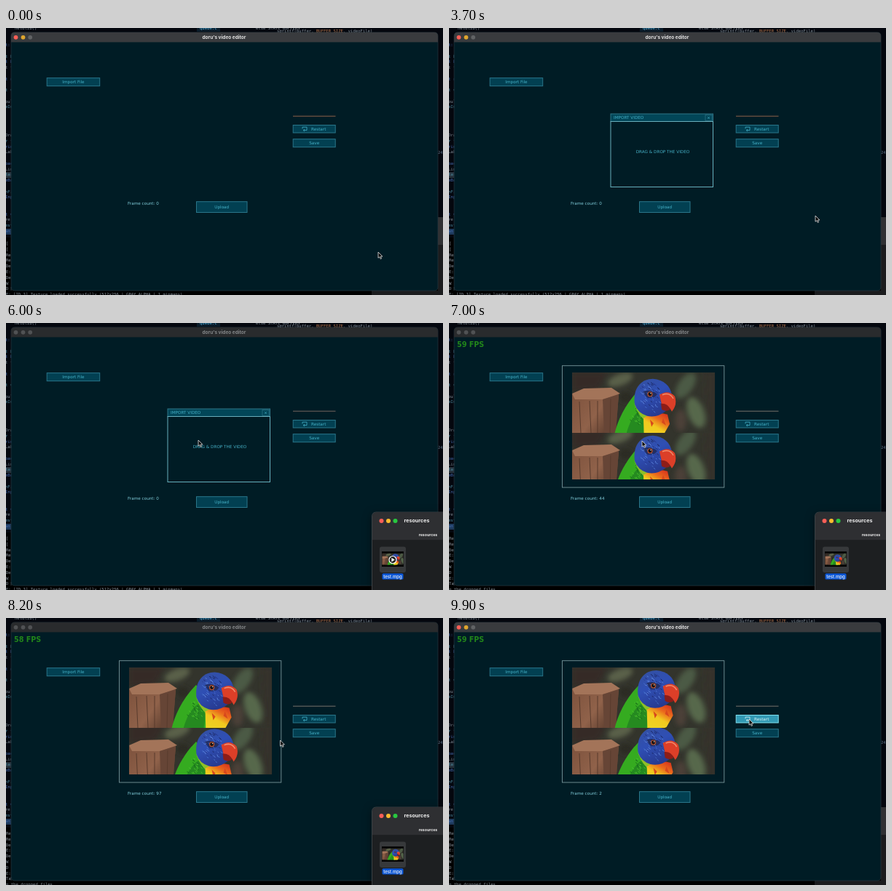
Write an HTML page that moves like this. It is 600 px wide and 367 px high and loops after 10000 ms.

```html
<!DOCTYPE html>
<html lang="en">
<head>
<meta charset="utf-8">
<title>Video editor</title>
<style>
html, body { margin: 0; width: 100%; height: 100%; overflow: hidden; background: #03060b; }
svg { display: block; }
#stage { width: 100vw; height: 100vh; }
.ui { font: 5.7px "DejaVu Sans", sans-serif; fill: #45b0c6; }
.code { font: 5.6px "DejaVu Sans Mono", monospace; fill: #87929c; white-space: pre; }
.mac { font: 700 6.5px Inter, sans-serif; text-anchor: middle; }
.mid { text-anchor: middle; }
.btn rect { fill: #024052; stroke: #2a768a; }
.btn path { fill: none; stroke: #45b0c6; stroke-width: .8; }
.hover rect { fill: #3299b4; stroke: #82e0ee; }
.hover text { fill: #d5f2f6; }
.hover path { stroke: #d5f2f6; }
.press rect { fill: #ffbc51; stroke: #eb7630; }
.press text { fill: #d86f36; }
.shadow { filter: drop-shadow(0 3px 6px rgba(0, 0, 0, .5)); }
</style>
</head>
<body>
<svg id="stage" viewBox="0 0 600 367" preserveAspectRatio="none">
  <defs>
    <filter id="soft" x="-20%" y="-20%" width="140%" height="140%"><feGaussianBlur stdDeviation="3"/></filter>
    <filter id="blend"><feGaussianBlur stdDeviation=".6"/></filter>
    <linearGradient id="wood" x2="1" y2=".6">
      <stop stop-color="#7d523d"/><stop offset=".6" stop-color="#90624a"/><stop offset="1" stop-color="#5e3f30"/>
    </linearGradient>
    <linearGradient id="chest" x1=".8" x2=".3" y2="1">
      <stop stop-color="#d9361d"/><stop offset=".25" stop-color="#ea6a1c"/><stop offset=".5" stop-color="#f2c91f"/><stop offset="1" stop-color="#e9d824"/>
    </linearGradient>
    <linearGradient id="crown" x2=".5" y2="1">
      <stop stop-color="#34509f"/><stop offset=".5" stop-color="#2f4fb4"/><stop offset="1" stop-color="#273a90"/>
    </linearGradient>
    <g id="bird">
      <rect width="196" height="83" fill="#33342c"/>
      <g filter="url(#soft)">
        <path d="M0 0H48L36 22 0 26Z" fill="#352a25"/>
        <ellipse cx="66" cy="10" rx="18" ry="8" fill="#5a6148" transform="rotate(-20 66 10)"/>
        <ellipse cx="74" cy="34" rx="9" ry="7" fill="#2a2c23"/>
        <ellipse cx="156" cy="18" rx="10" ry="20" fill="#4c5a44" transform="rotate(35 156 18)"/>
        <ellipse cx="170" cy="55" rx="11" ry="22" fill="#56684c" transform="rotate(-20 170 55)"/>
        <ellipse cx="149" cy="66" rx="8" ry="15" fill="#4c3f37"/>
        <path d="M182 0H196V83H186Z" fill="#35302b"/>
      </g>
      <g filter="url(#blend)">
        <path d="M0 30H64L60 83H0Z" fill="url(#wood)"/>
        <path d="M0 29L16 22 54 21 66 29 42 37 4 37Z" fill="#a37459"/>
        <path d="M42 37L64 30 60 83H44Z" fill="#664536"/>
        <path d="M10 40L12 83M24 39 26 83M35 39V83M53 36 52 83" stroke="#583b2d"/>
      </g>
      <g filter="url(#blend)">
        <path d="M58 86C62 66 74 42 92 24L114 52 112 88Z" fill="#35ab20"/>
        <path d="M74 86C78 70 84 58 95 50L105 64 102 88Z" fill="#258a20"/>
        <g id="back"></g>
      </g>
      <g id="pose" filter="url(#blend)">
        <path d="M90 37Q100 55 122 53L110 64Q97 58 90 37Z" fill="#8fbf27"/>
        <path d="M103 58Q119 48 136 53L139 66 130 82 104 92Z" fill="url(#chest)"/>
        <path d="M112 60L117 65 114 70ZM130 58L134 68 128 64Z" fill="#d8481d"/>
        <path d="M91 39C88 18 99 4 116 4 131 5 140 14 142 26L134 48Q122 58 108 55 95 51 91 39Z" fill="url(#crown)"/>
        <path d="M102 22Q112 17 122 25 118 32 108 30Z" fill="#232f63"/>
        <g id="down"></g>
        <path d="M125 26Q137 18 146 28 150 39 142 49 138 40 128 39Z" fill="#dc3f28"/>
        <path d="M127 38Q136 37 140 46 134 50 128 46Z" fill="#8c1d18"/>
        <path d="M129 26Q139 22 144 31" fill="none" stroke="#f08e6c" stroke-width="1.5"/>
        <circle cx="112" cy="25" r="3.6" fill="#b4512c"/>
        <circle cx="112" cy="25" r="2.4" fill="#101014"/>
        <circle cx="113" cy="24" r=".7" fill="#fff"/>
      </g>
    </g>
    <g id="thumb">
      <rect x="-15" y="-10.5" width="30" height="21" fill="#050505"/>
      <svg x="-14.5" y="-8" width="29" height="16" viewBox="22 0 150 83"><use href="#bird"/></svg>
    </g>
  </defs>

  <rect width="600" height="367" fill="#04070e"/>
  <rect y="288" width="600" height="79" fill="#000"/>
  <rect y="198" width="7" height="8" fill="#27323c"/>
  <rect y="276" width="7" height="8" fill="#1d3a5c"/>
  <g class="code">
    <text x="12" y="1.5">netdlib()</text>
    <rect x="262" width="32" height="5" fill="#0a1c2a"/>
    <text x="266" y="2.2" fill="#55b8e8">queue.c</text>
    <text x="343" y="1.5">else STATE_BUFFERS</text>
    <text x="372" y="6">sprintf(buffer, <tspan fill="#b9784f">BUFFER_SIZE</tspan>, videoFile)</text>
    <text x="593" y="172.5" style="fill:#5b7085">24</text>
  </g>
  <g id="left" class="code"></g>
  <g id="log" class="code"></g>
  <path d="M502 367V361H593V260H600V367Z" fill="#1b1c1e"/>
  <path d="M593 260H600V298H593Z" fill="#303133"/>

  <path d="M7 361V11Q7 6 12 6H588Q593 6 593 11V356Q593 361 588 361H12Q7 361 7 356Z" fill="#001c25" stroke="#26383f" stroke-width=".7"/>
  <path id="bar" d="M7 19.5V11Q7 6 12 6H588Q593 6 593 11V19.5Z"/>
  <g id="lights"><circle cx="13.5" cy="12.8" r="2.9"/><circle cx="23.5" cy="12.8" r="2.9"/><circle cx="33.2" cy="12.8" r="2.9"/></g>
  <text id="title" class="mac" x="299.5" y="15">doru's video editor</text>

  <g id="ui" class="ui">
    <path id="rule" d="M394 121.2H452.5"/>
    <text id="count" x="167" y="243" style="fill:#7fcbd8"></text>
  </g>

  <g id="popup" class="ui">
    <rect x="222" y="118" width="140.5" height="10.5" fill="#024658" stroke="#2f7486"/>
    <text x="226" y="125.4">IMPORT VIDEO</text>
    <rect x="352" y="119.5" width="9" height="8" fill="#024658" stroke="#2f7486" stroke-width=".7"/>
    <path d="M355.2 122.2L357.8 124.8M357.8 122.2L355.2 124.8" stroke="#51bfd3" stroke-width=".7"/>
    <rect x="222" y="128.5" width="140.5" height="90" fill="#001c25" stroke="#69aebb"/>
    <text x="293.5" y="172.2" class="mid">DRAG &amp; DROP THE VIDEO</text>
  </g>

  <g id="player">
    <text id="fps" x="11" y="32.8" font-family="DejaVu Sans, sans-serif" font-weight="700" font-size="9.6" fill="#21861a"></text>
    <rect x="155.5" y="58.7" width="222.3" height="167.3" fill="none" stroke="#78959a" stroke-width=".9"/>
    <svg x="169" y="68" width="196" height="83" viewBox="0 0 196 83"><use href="#bird"/></svg>
    <svg x="169" y="151" width="196" height="64" viewBox="0 5 196 64"><use href="#bird"/></svg>
  </g>

  <g id="finder">
    <path class="shadow" d="M502.5 370V266Q502.5 260 508.5 260H602V370Z" fill="#1d1f21" stroke="#515456" stroke-width=".7"/>
    <path d="M503 298V266Q503 260.5 508.5 260.5H600V298Z" fill="#2e2f32"/>
    <path d="M503 298.5H600" stroke="#202123" stroke-width=".7"/>
    <circle cx="515.5" cy="272" r="3" fill="#fe5f57"/>
    <circle cx="525" cy="272" r="3" fill="#febc2e"/>
    <circle cx="534.5" cy="272" r="3" fill="#28c840"/>
    <g class="mac" fill="#eee">
      <text x="564" y="274.4" style="font-size:7.1px">resources</text>
      <text x="579.5" y="293.4" style="font-size:5.2px">resources</text>
    </g>
    <rect class="sel" x="513" y="307.5" width="36" height="35.5" rx="3" fill="#37393b"/>
    <use href="#thumb" x="531" y="324.5"/>
    <g id="play">
      <circle cx="531" cy="325.5" r="5" fill="#222" stroke="#fff" stroke-width="1.2"/>
      <path d="M529.4 322.8V328.2L533.8 325.5Z" fill="#fff"/>
    </g>
    <rect class="sel" x="516.5" y="344.2" width="29" height="8.4" rx="1.6" fill="#0b57d8"/>
    <text class="mac" x="531" y="350.5" fill="#f2f2f2" style="font-size:6px;font-weight:500">test.mpg</text>
  </g>

  <use id="ghost" href="#thumb" opacity=".6"/>
  <path id="cursor" d="M0 0V8.2L1.9 6.5 3.2 9.4 4.6 8.8 3.3 6H5.9Z" fill="#0a0a0a" stroke="#e4e4e4" stroke-width=".8" stroke-linejoin="round"/>
</svg>
<script>
const NS = 'http://www.w3.org/2000/svg';
const $ = id => document.getElementById(id);
const LOOP = 10000, STEP = 100, RATE = 44;
const DROP = 6000, RESTART = 9855;

function add(parent, tag, attrs, text) {
  const el = document.createElementNS(NS, tag);
  for (const k in attrs) el.setAttribute(k, attrs[k]);
  if (text) el.textContent = text;
  return parent.appendChild(el);
}

function button(x, y, w, h, label, shift = 0) {
  const g = add($('ui'), 'g', { class: 'btn' });
  add(g, 'rect', { x, y, width: w, height: h });
  add(g, 'text', { x: x + w / 2 + shift, y: y + h / 2 + 2, class: 'mid' }, label);
  return { g, x, y, w, h };
}
const importBtn = button(56.2, 68.7, 72.5, 11, 'Import File');
const restartBtn = button(394.2, 133.5, 58, 10.5, 'Restart', 6);
const saveBtn = button(394.2, 152.7, 58, 11, 'Save');
const uploadBtn = button(261.5, 238.7, 69.5, 14.8, 'Upload');
const buttons = [importBtn, restartBtn, saveBtn, uploadBtn];
add(restartBtn.g, 'path', { d: 'M407 138.5V136.2H413V140.6H408.5M410 139L408.2 140.6 410 142.2' });

// Editor and log text peeking out behind the window
const hues = ['#4268ab', '#7d8994', '#4a8aa0'];
't:||t b|t b|t f||t r||t v||pul|eIm|||||Dra|r f|rin|Lab||pac|Lin|tar|eBu||nFi|Inp|||t v| re|est| an'
  .split('|').forEach((s, i) => add($('left'), 'text', { x: -1, y: 25 + i * 7.75, style: 'fill:' + hues[i % 3] }, s));
const log = [' [', ' [', 'Ren', 'Ren', 'Def', 'E:', 'Def', ' W', ' D',
  'E: [ID 3] Texture loaded successfully (512x256 | GRAY_ALPHA | 1 mipmaps)', ' Ta', 'n the dropped files'];
const logRows = log.slice(0, 10).map((s, i) => add($('log'), 'text', { x: 0, y: 298 + i * 7.8 }));

// Feather flecks scattered over an ellipse
let seed = 7;
const rnd = () => (seed = seed * 16807 % 2147483647) / 2147483647;
function flecks(group, count, cx, cy, rx, ry, colors) {
  for (let i = 0; i < count; i++) {
    const a = rnd() * 2 * Math.PI, r = Math.sqrt(rnd());
    const x = cx + Math.cos(a) * r * rx, y = cy + Math.sin(a) * r * ry;
    add($(group), 'path', { d: `M${x} ${y}l${1 + rnd() * 2} ${1 + rnd() * 2}`, stroke: colors[i % colors.length] });
  }
}
flecks('down', 70, 111, 29, 16, 21, ['#1d2c6b', '#5b80d8', '#28398f', '#4670cc']);
flecks('back', 30, 90, 62, 12, 16, ['#49c02c', '#196f1b']);

// Pointer stops: time, x, y
const stops = [
  [0, 511, 308], [200, 511, 308], [500, 595, 302], [800, 595, 302], [1300, 540, 306],
  [2000, 182, 133], [2300, 96, 75], [2800, 96, 75], [3500, 502, 257], [3600, 502, 257],
  [3700, 503, 258], [4000, 596, 290], [4300, 596, 290], [4700, 531, 325], [4900, 531, 325],
  [5800, 264, 161], [6300, 264, 161], [7000, 265, 162], [7600, 267, 163], [8200, 376.5, 168],
  [8800, 410, 141], [9300, 412, 139], [LOOP, 412, 139]
];
function pointer(t) {
  const i = stops.findIndex(s => s[0] > t);
  const [t0, x0, y0] = stops[i - 1], [t1, x1, y1] = stops[i];
  const p = (t - t0) / (t1 - t0), e = p * p * (3 - 2 * p);
  return [x0 + (x1 - x0) * e, y0 + (y1 - y0) * e];
}

const within = (t, a, b) => t >= a && t < b;
const show = (el, on) => { el.style.display = on ? '' : 'none'; };
const move = (el, x, y) => el.setAttribute('transform', `translate(${x} ${y})`);

function draw(t) {
  const finder = within(t, 600, 2400) || within(t, 4100, 9500);
  const playing = t > DROP, selected = t >= 4800;
  const [x, y] = pointer(t);

  $('bar').style.fill = finder ? '#292b2d' : '#393b3e';
  $('title').style.fill = finder ? '#85888a' : '#e4e4e4';
  const colors = finder ? ['#505254', '#505254', '#505254'] : ['#fe5f57', '#e0a62e', '#616365'];
  [...$('lights').children].forEach((c, i) => { c.style.fill = colors[i]; });
  $('rule').style.stroke = playing ? '#77706a' : finder ? '#75645f' : '#8d6049';

  show($('finder'), finder);
  document.querySelectorAll('.sel').forEach(el => show(el, selected));
  show($('play'), within(t, 4600, DROP + 1));
  show($('popup'), t >= 2700 && !playing);
  show($('player'), playing);
  show($('ghost'), within(t, 5000, 5900));
  move($('ghost'), x, y);
  move($('cursor'), x, y);

  const n = playing ? Math.round((t - (t >= RESTART ? RESTART : DROP)) * RATE / 1000) : 0;
  $('count').textContent = 'Frame count: ' + n;
  $('fps').textContent = (within(t, 7700, 8700) ? 58 : 59) + ' FPS';
  move($('pose'), -5 * Math.sin(n / 28), 3 * (1 - Math.cos(n / 20)));

  const shift = playing ? 2 : 0;
  logRows.forEach((row, i) => { row.textContent = log[i + shift]; });

  const pressed = t === 2600 || t === 9800;
  for (const b of buttons) {
    const over = !(finder && x > 502 && y > 260) && within(x, b.x, b.x + b.w) && within(y, b.y, b.y + b.h);
    b.g.setAttribute('class', 'btn' + (over ? pressed ? ' press' : ' hover' : ''));
  }
}

const start = performance.now();
let last = -1;
function tick() {
  const t = Math.floor((performance.now() - start) % LOOP / STEP) * STEP;
  if (t !== last) draw(last = t);
  requestAnimationFrame(tick);
}
tick();
</script>
</body>
</html>
```
